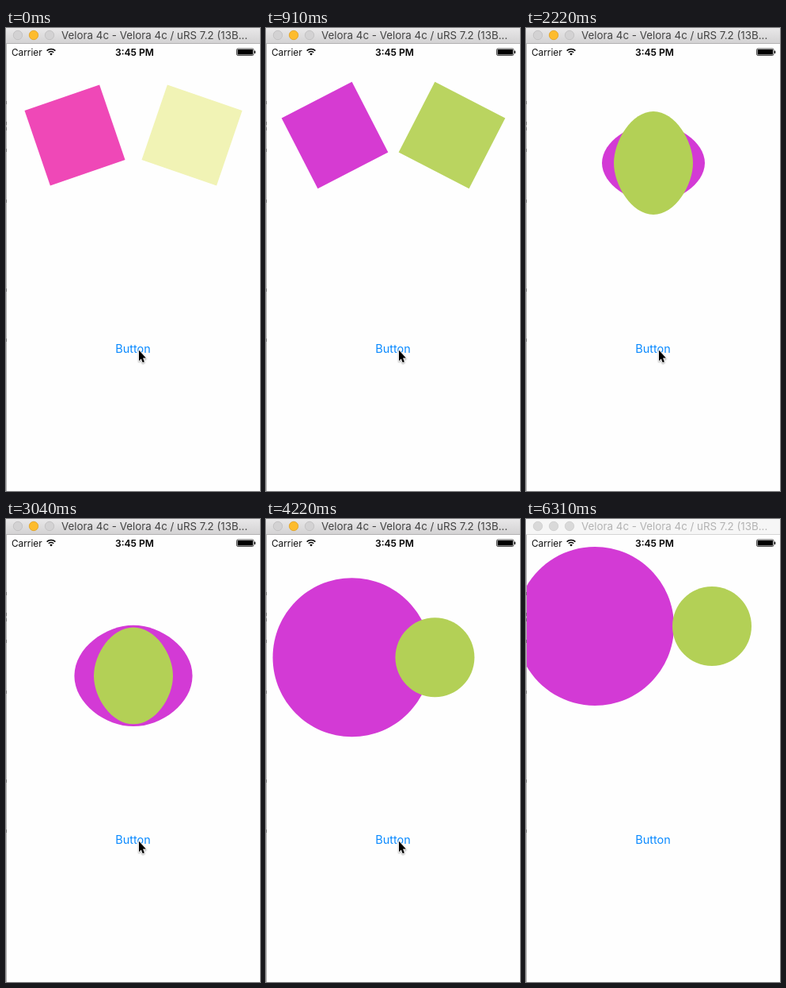
Recreate the animation shown at these times as an HTML page with a canvas. Size 321 by 583 pixels, loop 6410 ms.

```html
<!DOCTYPE html>
<html lang="en">
<head>
<meta charset="utf-8">
<title>Shape animation</title>
<style>
  html, body { margin: 0; width: 100%; height: 100%; overflow: hidden; background: #fefefe; }
  canvas { display: block; width: 321px; height: 583px; }
</style>
</head>
<body>
<canvas id="stage"></canvas>
<script>
const W = 321, H = 583, LOOP = 6410;
const FONT = 'Inter, Roboto, sans-serif';
const canvas = document.getElementById('stage');
const ctx = canvas.getContext('2d');
const dpr = window.devicePixelRatio || 1;
canvas.width = W * dpr;
canvas.height = H * dpr;

// Stage start times in ms
const MOVE = 1020, STRETCH = 1505, ROUND = 1990, GROW = 2950, PART = 3908;

const clamp = x => Math.max(0, Math.min(1, x));
const mix = (a, b, k) => a + (b - a) * k;
const mixColor = (a, b, k) => `rgb(${a.map((v, i) => Math.round(mix(v, b[i], k)))})`;

// Cubic bezier (.42, 0, .58, 1), solved for x by bisection
function easeInOut(x) {
  if (x <= 0 || x >= 1) return clamp(x);
  let lo = 0, hi = 1;
  for (let i = 0; i < 24; i++) {
    const s = (lo + hi) / 2, q = 1 - s;
    if (3 * q * q * s * 0.42 + 3 * q * s * s * 0.58 + s * s * s < x) lo = s;
    else hi = s;
  }
  return lo * lo * (3 - 2 * lo);
}

// Damped spring, damping ratio 0.5
function spring(ms) {
  if (ms <= 0) return 0;
  const a = ms * 0.00831, k = 1 / Math.sqrt(3);
  return 1 - Math.exp(-k * a) * (Math.cos(a) + k * Math.sin(a));
}

const eased = (t, start) => easeInOut((t - start) / 500);

// Rounded box; each corner reaches at most to the middle of its sides
function roundBox(x, y, w, h, r, angle, color) {
  const hw = w / 2, hh = h / 2;
  const cx = hw - Math.min(r, hw), cy = hh - Math.min(r, hh);
  const k = 0.5523 * Math.min(r, hw, hh);
  ctx.save();
  ctx.translate(x, y);
  ctx.rotate(angle);
  ctx.beginPath();
  ctx.moveTo(hw, -cy);
  ctx.lineTo(hw, cy);
  ctx.bezierCurveTo(hw, cy + k, cx + k, hh, cx, hh);
  ctx.lineTo(-cx, hh);
  ctx.bezierCurveTo(-cx - k, hh, -hw, cy + k, -hw, cy);
  ctx.lineTo(-hw, -cy);
  ctx.bezierCurveTo(-hw, -cy - k, -cx - k, -hh, -cx, -hh);
  ctx.lineTo(cx, -hh);
  ctx.bezierCurveTo(cx + k, -hh, hw, -cy - k, hw, -cy);
  ctx.closePath();
  ctx.fillStyle = color;
  ctx.fill();
  ctx.restore();
}

function drawShapes(t) {
  const tint = clamp(t / MOVE);
  const join = eased(t, MOVE), stretch = eased(t, STRETCH);
  const grow = t < PART ? spring(t - GROW) : 1;
  const part = eased(t, PART);

  const turn = mix(mix(18.8, 129, tint), 180, join) * Math.PI / 180;
  const gap = 74 * (1 - join + part);
  const y = mix(mix(135, 170, join) + 100 * grow, 135, part);
  const extra = 30 * stretch * (1 - clamp(grow));
  const r = 70 * clamp(spring(t - ROUND));
  const size = mix(100, 200, grow);

  roundBox(161 - gap, y, size + extra, size, mix(r, 120, grow),
    -turn, mixColor([239, 72, 183], [211, 58, 213], tint));
  roundBox(161 + gap, y, 100, 100 + extra, r,
    turn, mixColor([241, 243, 181], [179, 208, 86], tint));
}

function text(str, x, y, size, color, weight = 400, align = 'left') {
  ctx.font = `${weight} ${size}px ${FONT}`;
  ctx.textAlign = align;
  ctx.fillStyle = color;
  ctx.fillText(str, x, y);
}

function drawTitleBar(active) {
  const bar = ctx.createLinearGradient(0, 0, 0, 20);
  bar.addColorStop(0, active ? '#e9e8e9' : '#f6f6f6');
  bar.addColorStop(1, active ? '#d2d1d2' : '#f6f6f6');
  ctx.fillStyle = bar;
  ctx.fillRect(0, 0, W, 20);
  ctx.fillStyle = active ? '#b4b3b4' : '#d5d5d5';
  ctx.fillRect(0, 19, W, 1);
  [15, 35, 55].forEach((x, i) => {
    const lit = active && i === 1;
    ctx.beginPath();
    ctx.arc(x, 9, 5.7, 0, 7);
    ctx.fillStyle = lit ? '#fdbc2e' : active ? '#d3d2d3' : '#d9d9d9';
    ctx.fill();
    ctx.lineWidth = 0.8;
    ctx.strokeStyle = lit ? '#dfa023' : active ? '#bebdbe' : '#cccccc';
    ctx.stroke();
  });
  text('Velora 4c - Velora 4c / uRS 7.2 (13B...', 70, 14, 13.35, active ? '#434343' : '#b3b3b3');
}

function drawStatusBar() {
  text('Carrier', 7, 34.5, 11.8, '#111');
  text('3:45 PM', 162.5, 34.5, 12.1, '#000', 600, 'center');

  ctx.strokeStyle = '#000';
  ctx.lineWidth = 1.5;
  for (const r of [4.6, 7.6]) {
    ctx.beginPath();
    ctx.arc(57, 34, r, -Math.PI * 0.75, -Math.PI * 0.25);
    ctx.stroke();
  }
  ctx.fillStyle = '#000';
  ctx.beginPath();
  ctx.moveTo(57, 34.5);
  ctx.arc(57, 34.5, 2.6, -Math.PI * 0.75, -Math.PI * 0.25);
  ctx.fill();

  ctx.lineWidth = 0.7;
  ctx.beginPath();
  ctx.roundRect(291.5, 26, 21.5, 8.5, 1.6);
  ctx.stroke();
  ctx.fillRect(292.6, 27, 19.3, 6.5);
  ctx.fillRect(313.8, 28.7, 1.4, 3.2);
}

function drawEdge() {
  ctx.fillStyle = '#b2b2b2';
  ctx.fillRect(0, 20, 1, H - 20);
  ctx.fillStyle = '#777';
  for (const y of [92, 118, 125, 152, 216, 328, 391]) ctx.fillRect(0, y, 1, 4);
}

function drawCursor(t) {
  const u = clamp((t - 5330) / 420);
  if (u === 1) return;
  ctx.save();
  ctx.translate(168 + 108 * u * u, 405.8 + 180 * u ** 1.5);
  ctx.scale(0.86, 0.92);
  ctx.beginPath();
  [[0, 0], [0, 14.6], [3.3, 11.5], [5.5, 16.7], [8, 15.6], [5.9, 10.6], [10.4, 10.6]]
    .forEach(([x, y]) => ctx.lineTo(x, y));
  ctx.closePath();
  ctx.lineJoin = 'round';
  ctx.lineWidth = 1.8;
  ctx.strokeStyle = '#fff';
  ctx.shadowColor = 'rgba(0,0,0,.4)';
  ctx.shadowBlur = 2 * dpr;
  ctx.shadowOffsetY = dpr;
  ctx.stroke();
  ctx.shadowColor = 'transparent';
  ctx.fillStyle = '#000';
  ctx.fill();
  ctx.restore();
}

function draw(t) {
  ctx.setTransform(dpr, 0, 0, dpr, 0, 0);
  ctx.fillStyle = '#fefefe';
  ctx.fillRect(0, 0, W, H);
  text('Button', 160.5, 409, 14.4, '#0a8aff', 400, 'center');
  drawShapes(t);
  drawEdge();
  drawStatusBar();
  drawTitleBar(t < 6310);
  drawCursor(t);
}

const begin = performance.now();
function tick() {
  draw((performance.now() - begin) % LOOP);
  requestAnimationFrame(tick);
}
tick();
</script>
</body>
</html>
```
